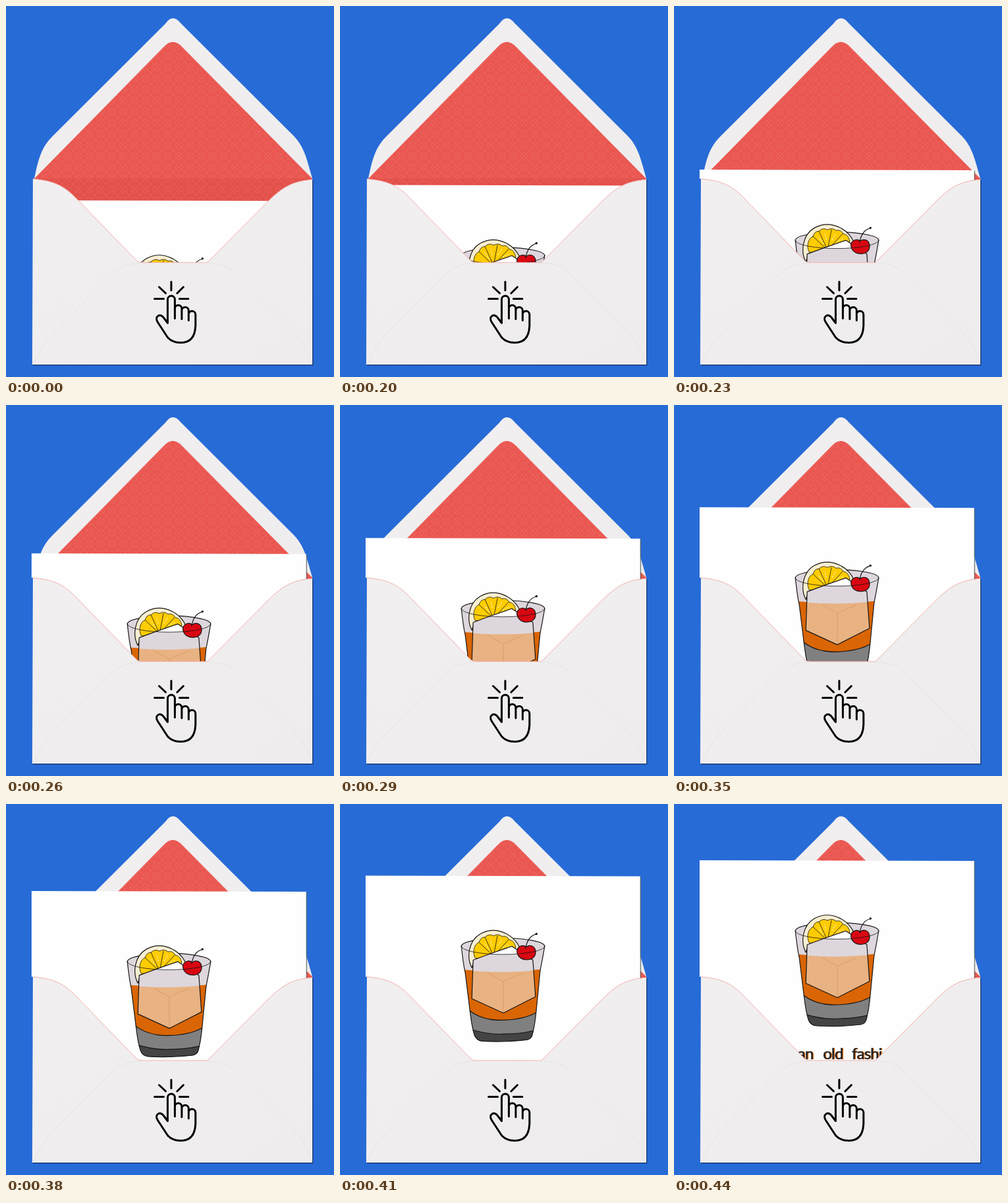
Write an HTML page that moves like this. It is 500 px wide and 567 px high and loops after 3.87 s.

```html
<!DOCTYPE html>
<html lang="en">
<head>
<meta charset="utf-8">
<title>Card in an envelope</title>
<style>
html, body { margin: 0; width: 100%; height: 100%; overflow: hidden; background: #276bd7; }
svg { display: block; width: 100%; height: 100%; }
.ink { fill: none; stroke: #151515; stroke-width: 1.2; stroke-linecap: round; stroke-linejoin: round; }
.fine { stroke-width: .8; }
.icon { fill: none; stroke: #000; stroke-width: 3; stroke-linecap: round; stroke-linejoin: round; }
.caption { font: 24px Lato, sans-serif; letter-spacing: -.8px; }
</style>
</head>
<body>
<svg viewBox="0 0 500 567">
  <defs>
    <linearGradient id="paper" x1="0" y1="0" x2="1" y2="1">
      <stop offset="0" stop-color="#f1eff0"/>
      <stop offset="1" stop-color="#eeeced"/>
    </linearGradient>
    <pattern id="lattice" width="17" height="17" patternUnits="userSpaceOnUse">
      <path d="M0 0L17 17M17 0L0 17M8.500 2L15 8.500L8.500 15L2 8.500Z" fill="none" stroke="#fff" stroke-opacity=".09"/>
    </pattern>
    <path id="glassShape" d="M185 194Q188 222 191 235L198 292Q201 318 205 330Q208 338 217 339Q250 341 285 337Q292 335 293 330Q297 315 299 294L305 232Q309 212 312 194"/>
    <path id="iceShape" d="M203 215L230 205L262 194L294 215L298 271L249 296L201 274Z"/>
    <path id="pocketEdge" d="M41 264C65 267 84 269 108 295L199 389Q202 392 207 392H307L400 298C425 273 440 268 467 265"/>
    <clipPath id="opening"><path d="M0 0H500V400H41V264H0Z"/></clipPath>
    <clipPath id="glass"><use href="#glassShape"/></clipPath>
    <clipPath id="ice"><use href="#iceShape"/></clipPath>
    <g id="words">
      <text x="212" y="390" text-anchor="end">an</text>
      <text x="227" y="390">old</text>
      <text x="271" y="390">fashioned</text>
    </g>
  </defs>

  <rect width="500" height="567" fill="#276bd7"/>

  <!-- open flap and lining -->
  <path d="M243 27Q254 11 266 26L439 199C455 216 459 235 467 264H43C50 232 54 216 71 199Z" fill="url(#paper)"/>
  <path d="M240.500 62.500Q254 48 268 62L467 264V268L400 310H110L43 268V264Z" fill="#ea5650"/>
  <path d="M43 264H467L400 310H110Z" fill="#e4504a"/>
  <path d="M240.500 62.500Q254 48 268 62L467 264L400 310H110L43 264Z" fill="url(#lattice)"/>
  <path d="M43 264H467" stroke="#d94c46" stroke-opacity=".6" stroke-width=".7"/>

  <g clip-path="url(#opening)">
    <g id="card">
      <path d="M40 87L459 88V417H40Z" fill="#566" opacity=".75"/>
      <path d="M39 86L457.500 87V417H39Z" fill="#fefefe"/>

      <!-- glass and drink -->
      <ellipse cx="248.500" cy="194" rx="63.500" ry="12.500" fill="#ddd7dd"/>
      <g clip-path="url(#glass)">
        <rect x="180" y="190" width="140" height="155" fill="#ddd7dd"/>
        <path d="M180 229Q248 236 320 228V345H180Z" fill="#da6504"/>
        <path class="ink" d="M196 291Q215 307 246 307Q282 306 301 294V350H190Z" style="fill:#808080"/>
        <path class="ink" d="M190 318Q225 330 250 328Q282 328 305 320V350H190Z" style="fill:#444"/>
      </g>
      <path class="ink" d="M185 194A63.500 12.500 0 0 1 312 194"/>

      <!-- citrus slice -->
      <path class="ink" d="M201 227C193 212 195 186 214 175C240 161 271 178 277 205L268 214L203 220Z" style="fill:#f8eed0"/>
      <path class="ink fine" d="M206 212C201 203 205 190 212 188Q214 180 221 180Q227 174 234 178Q241 174 247 179Q254 177 258 184Q266 185 268 196L236 211Z" style="fill:#fc0"/>
      <path class="ink fine" d="M234 209L212 188M234 209L221 180M234 209L240 178M234 209L257 184"/>
      <path d="M228 199L220 189M232 193L230 184M241 193L247 184M248 196L259 191" stroke="#fff3b0" stroke-width="1.400" stroke-dasharray="2 2"/>

      <!-- ice -->
      <g clip-path="url(#ice)">
        <rect x="195" y="190" width="110" height="110" fill="#ddd7dd"/>
        <path d="M230 206L262 193L276 206Z" fill="#fff"/>
        <path d="M195 231Q248 236 305 230V300H195Z" fill="#e9b282"/>
        <path d="M226 235L249 248L278 235M249 248V296" fill="none" stroke="#d99b67"/>
      </g>
      <use href="#iceShape" class="ink"/>
      <use href="#glassShape" class="ink"/>

      <!-- cherry -->
      <path class="ink" d="M284 195C277 190 268 196 270 204C272 212 279 215 286 214.500C295 214 299 208 298 201C297 193 289 191 284 195Z" style="fill:#d90712"/>
      <path class="ink" d="M283 197Q286 179 299 175.500"/>
      <circle cx="299.500" cy="175" r="1.700" fill="#151515"/>
      <path class="ink fine" d="M185 194A63.500 12.500 0 0 0 312 194"/>

      <g class="caption">
        <use href="#words" x="1.500" fill="#db6a12"/>
        <use href="#words" fill="#222" stroke="#222" stroke-width=".4"/>
      </g>
    </g>
  </g>

  <!-- pocket -->
  <path d="M41 548.500H467.500V266" fill="none" stroke="#142f60" stroke-width="1.300"/>
  <path d="M41 264C65 267 84 269 108 295L199 389Q202 392 207 392H307L400 298C425 273 440 268 467 265V548H40Z" fill="url(#paper)"/>
  <use href="#pocketEdge" fill="none" stroke="#f2a6a2" stroke-width=".9"/>
  <g fill="none" stroke="#e6e4e5">
    <path d="M43 546C52 520 66 506 82 490L164 407Q180 393 207 393M307 393Q333 393 347 405L430 488C447 505 458 520 466 545"/>
    <path d="M41 547H467" stroke="#f8f7f7"/>
  </g>

  <!-- tap icon -->
  <g class="icon" transform="translate(-.6 -.5)">
    <path d="M252.500 422V435M234 430L244 439.500M271 430L261.500 439.500M227 448H241M265 448H278.500"/>
    <path d="M247 485V449A5.500 5.500 0 0 1 258 449V478M258 463A5.200 5.200 0 0 1 268.500 463V479M268.500 466A5.200 5.200 0 0 1 279 466V481M279 471A5.300 5.300 0 0 1 289.500 472V489C289 505 282 515 267 515Q254 515 247 507L232 484C226 475 236 469 241 477L247 485"/>
  </g>
</svg>
<script>
const LOOP = 3870, START = 200, STEP = 30, STEPS = 9, TRAVEL = 211;
const card = document.getElementById("card");

function render(time) {
  const t = time % LOOP;
  const step = t < START ? 0 : Math.min(STEPS, Math.floor((t - START) / STEP) + 1);
  card.setAttribute("transform", `translate(0 ${TRAVEL * (1 - step / STEPS)})`);
}

const origin = performance.now();
function tick() {
  render(performance.now() - origin);
  requestAnimationFrame(tick);
}
tick();
</script>
</body>
</html>
```
